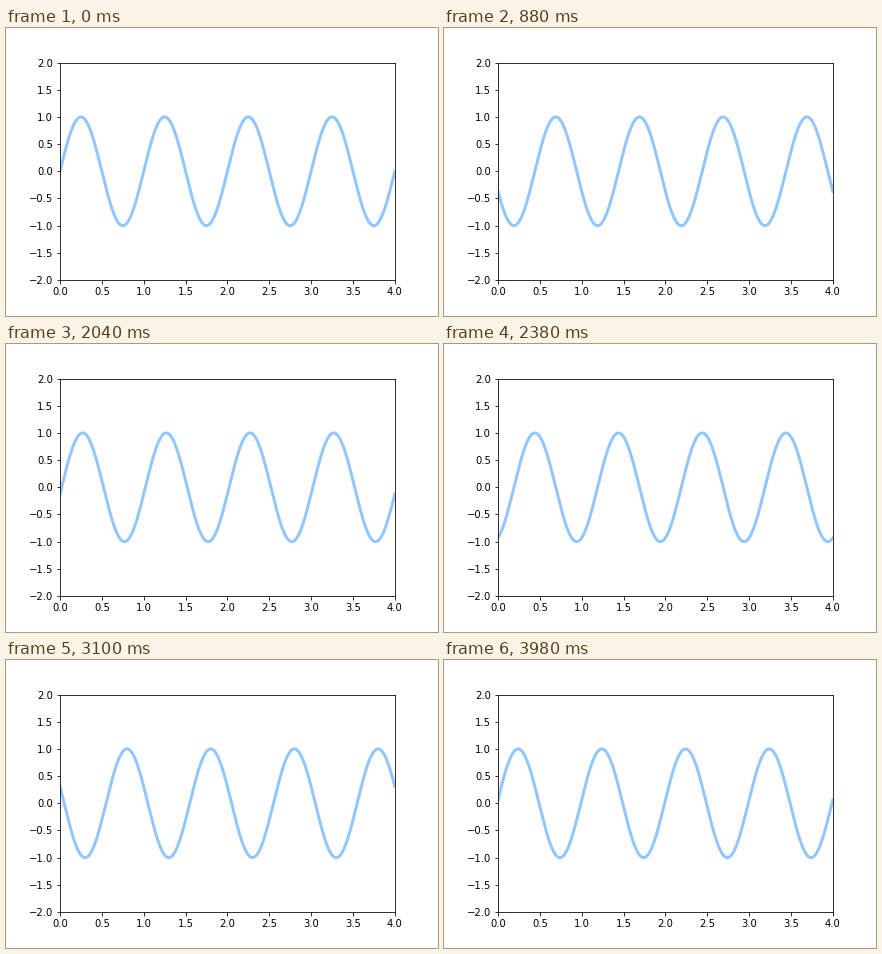
Animation, 432 px wide and 288 px high, one loop 4 s. Source, as a matplotlib script:

```python
import numpy as np
import matplotlib.pyplot as plt
from matplotlib.animation import FuncAnimation

FRAMES = 200
INTERVAL = 20  # ms

plt.rcParams.update({"font.family": "DejaVu Sans", "font.size": 10})

fig = plt.figure(figsize=(6, 4), dpi=72, facecolor="white")
fig.subplots_adjust(left=0.125, right=0.9, bottom=0.125, top=0.88)
ax = fig.add_subplot(xlim=(0, 4), ylim=(-2, 2))
ax.set_xticks(np.arange(0, 4.1, 0.5))
ax.set_yticks(np.arange(-2, 2.1, 0.5))

x = np.linspace(0, 4, 1000)
line, = ax.plot([], [], lw=3, color="#92C6FF")


def init():
    line.set_data([], [])
    return line,


def update(i):
    # The wave travels right by one period every 100 frames.
    line.set_data(x, np.sin(2 * np.pi * (x - 0.01 * i)))
    return line,


anim = FuncAnimation(fig, update, init_func=init, frames=FRAMES,
                     interval=INTERVAL, repeat=True, repeat_delay=0, blit=False)

plt.show()
```
